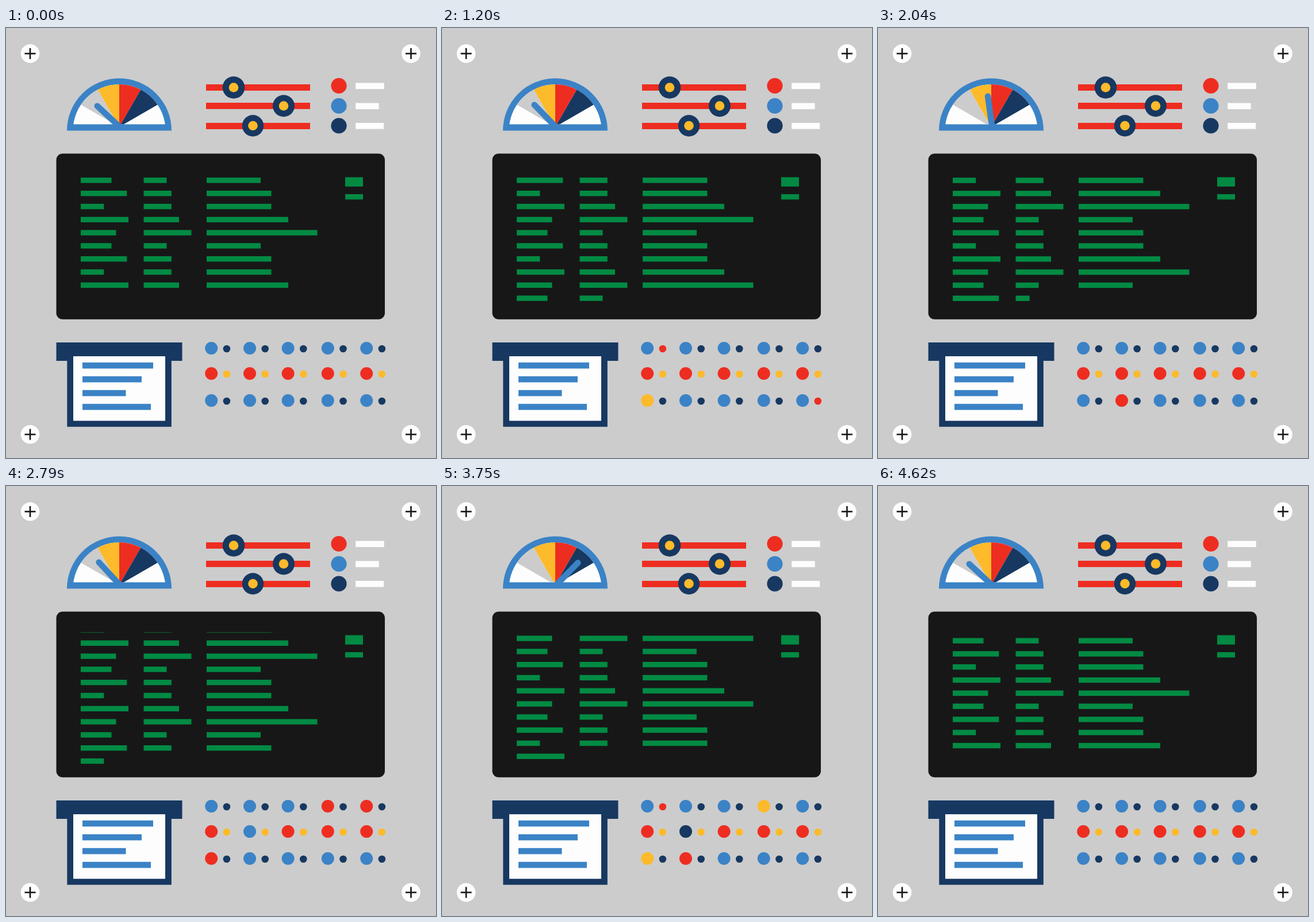
Recreate the animation shown at these times as an HTML page with a canvas. Size 748 by 748 pixels, loop 4.65 s.

```html
<!DOCTYPE html>
<html lang="en">
<head>
<meta charset="utf-8">
<title>Control panel</title>
<style>
  html, body { margin: 0; width: 100%; height: 100%; overflow: hidden; background: #ccc; }
  canvas { display: block; width: 100vmin; height: 100vmin; }
</style>
</head>
<body>
<canvas id="stage" width="748" height="748"></canvas>
<script>
const ctx = document.getElementById('stage').getContext('2d');
const LOOP = 4650, STEP = 30;
const GRAY = '#cccccc', WHITE = '#fdfdfd', BLACK = '#171717', GREEN = '#028a43';
const BLUE = '#3b83c6', NAVY = '#173861', RED = '#ee2d21', YELLOW = '#fdba2a';

const clamp01 = v => Math.min(1, Math.max(0, v));

function rect(x, y, w, h, color) {
  ctx.fillStyle = color;
  ctx.fillRect(x, y, w, h);
}

function disc(x, y, r, color) {
  ctx.fillStyle = color;
  ctx.beginPath();
  ctx.arc(x, y, r, 0, Math.PI * 2);
  ctx.fill();
}

function drawScrews() {
  for (const x of [42, 704.5]) {
    for (const y of [44.5, 707]) {
      disc(x, y, 16.3, WHITE);
      rect(x - 9.5, y - 1.3, 19, 2.6, BLACK);
      rect(x - 1.3, y - 9.5, 2.6, 19, BLACK);
    }
  }
}

// Needle keys: time, degrees from vertical, easing power towards the next key
const NEEDLE = [
  [0, -47.2, 1], [630, 44.2, 1.45], [1200, -44.3, 1], [2130, -4, 1], [2160, -4, 1],
  [2850, -46.5, 1], [3750, 44.2, 1], [4350, -47.2, 1], [LOOP, -47.2, 1]
];

function needleAngle(t) {
  const i = NEEDLE.findIndex(k => k[0] > t);
  const [t0, a0, power] = NEEDLE[i - 1], [t1, a1] = NEEDLE[i];
  return a0 + (a1 - a0) * Math.pow((t - t0) / (t1 - t0), power);
}

function drawGauge(t) {
  const cx = 197, cy = 178.5, hub = 172, rad = Math.PI / 180;
  ctx.fillStyle = BLUE;
  ctx.beginPath();
  ctx.arc(cx, cy, 91, Math.PI, 0);
  ctx.fill();

  ctx.save();
  ctx.beginPath();
  ctx.rect(100, 90, 200, 77.5);
  ctx.clip();
  ctx.beginPath();
  ctx.arc(cx, cy, 80.5, Math.PI, 0);
  ctx.clip();
  rect(100, 90, 200, 90, WHITE);
  [GRAY, YELLOW, RED, NAVY].forEach((color, i) => {
    ctx.fillStyle = color;
    ctx.beginPath();
    ctx.moveTo(cx, hub);
    ctx.arc(cx, hub, 120, (210 + i * 30) * rad, (240 + i * 30) * rad);
    ctx.fill();
  });
  ctx.restore();

  ctx.save();
  ctx.translate(198.5, 172.5);
  ctx.rotate(needleAngle(t) * rad);
  rect(-5.2, -54.3, 10.4, 54.3, BLUE);
  disc(0, -54.3, 5.2, BLUE);
  ctx.restore();
}

function drawSliders() {
  [[98, 396, 103.5, 19.3], [130, 483, 135.5, 19], [165, 429.5, 170, 18.7]].forEach(([top, x, y, r]) => {
    rect(348, top, 181, 11, RED);
    disc(x, y, r, NAVY);
    disc(x, y, 8.3, YELLOW);
  });
}

function drawLegend() {
  [[RED, 100.5, 49.5], [BLUE, 135.5, 40.5], [NAVY, 170, 49]].forEach(([color, y, w]) => {
    disc(579, y, 13.6, color);
    rect(608.2, y - 5, w, 10.7, WHITE);
  });
}

const COLUMNS = [130, 239.5, 349];
const ROWS = [[53.5, 40, 94], [80.3, 48.3, 112.5], [40.3, 48.3, 112.5], [83, 61.5, 142], [61.5, 83, 192.5]];
const SCROLL_ENDS = [33, 1233, 2074, 2882, 3784, LOOP + 33];
const TYPE_STARTS = [0, 1080, 1950, 2730, 3690];
const SCROLL_TIME = 160, TYPE_TIME = 60, VISIBLE = 9, PITCH = 22.8;

function drawTerminal(t) {
  ctx.fillStyle = BLACK;
  ctx.beginPath();
  ctx.roundRect(87.5, 218.5, 571.5, 288.3, 11);
  ctx.fill();
  rect(590, 259.5, 31, 16.3, GREEN);
  rect(590, 289, 31, 9.3, GREEN);

  const scroll = SCROLL_ENDS.reduce((s, end) => s + clamp01(1 - (end - t) / SCROLL_TIME), -1);
  ctx.save();
  ctx.beginPath();
  ctx.rect(88, 254.5, 570, 250);
  ctx.clip();
  for (let r = -1; r < VISIBLE + TYPE_STARTS.length; r++) {
    const y = 255.5 + (r - scroll) * PITCH;
    // Typed rows fill one column after another
    const typed = r < VISIBLE ? COLUMNS.length : (t - TYPE_STARTS[r - VISIBLE]) / TYPE_TIME;
    if (typed <= 0) continue;
    ROWS[(r + 5) % 5].forEach((w, c) => rect(COLUMNS[c], y, w * clamp01(typed - c), 9.4, GREEN));
  }
  ctx.restore();
}

function drawPrinter() {
  rect(87.5, 547, 219, 32, NAVY);
  rect(106.3, 560, 181.5, 133.7, NAVY);
  rect(117, 571, 160, 112.3, WHITE);
  [123, 103, 75.5, 119].forEach((w, i) => rect(133, 581.8 + i * 24, w, 10.6, BLUE));
}

// Blinks: size, column, row, colour, on, off
const BLINKS = [
  ['big', 1, 2, RED, 480, 840], ['big', 1, 2, RED, 1860, 2130], ['big', 1, 2, RED, 3600, 3990],
  ['big', 0, 2, YELLOW, 1050, 1350], ['big', 0, 2, RED, 2640, 2940], ['big', 0, 2, YELLOW, 3570, 3870],
  ['big', 3, 0, RED, 450, 780], ['big', 3, 0, RED, 2610, 2970], ['big', 3, 0, YELLOW, 3600, 3900],
  ['big', 1, 1, NAVY, 510, 810], ['big', 1, 1, BLUE, 2700, 3000], ['big', 1, 1, NAVY, 3600, 3900],
  ['big', 4, 0, RED, 2550, 3300],
  ['small', 0, 0, RED, 1080, 1380], ['small', 0, 0, RED, 3630, 3930],
  ['small', 4, 2, RED, 1020, 1290], ['small', 4, 2, RED, 2100, 2400],
  ['small', 4, 2, RED, 2850, 3120], ['small', 4, 2, RED, 4200, 4500]
];

function drawLamps(t) {
  const lit = BLINKS.filter(b => t >= b[4] && t < b[5]);
  const lampColor = (size, col, row, base) => {
    const blink = lit.find(b => b[0] === size && b[1] === col && b[2] === row);
    return blink ? blink[3] : base;
  };
  [557, 601, 648].forEach((y, row) => {
    [357.2, 424, 490.6, 559.8, 627.2].forEach((x, col) => {
      disc(x, y, 11, lampColor('big', col, row, row === 1 ? RED : BLUE));
      disc(x + 26.7, y + 1, 6.3, lampColor('small', col, row, row === 1 ? YELLOW : NAVY));
    });
  });
}

function draw(t) {
  rect(0, 0, 748, 748, GRAY);
  drawScrews();
  drawGauge(t);
  drawSliders();
  drawLegend();
  drawTerminal(t);
  drawPrinter();
  drawLamps(t);
}

let start = null;
function tick(now) {
  if (start === null) start = now;
  draw(Math.floor((now - start) % LOOP / STEP) * STEP);
  requestAnimationFrame(tick);
}
draw(0);
requestAnimationFrame(tick);
</script>
</body>
</html>
```
